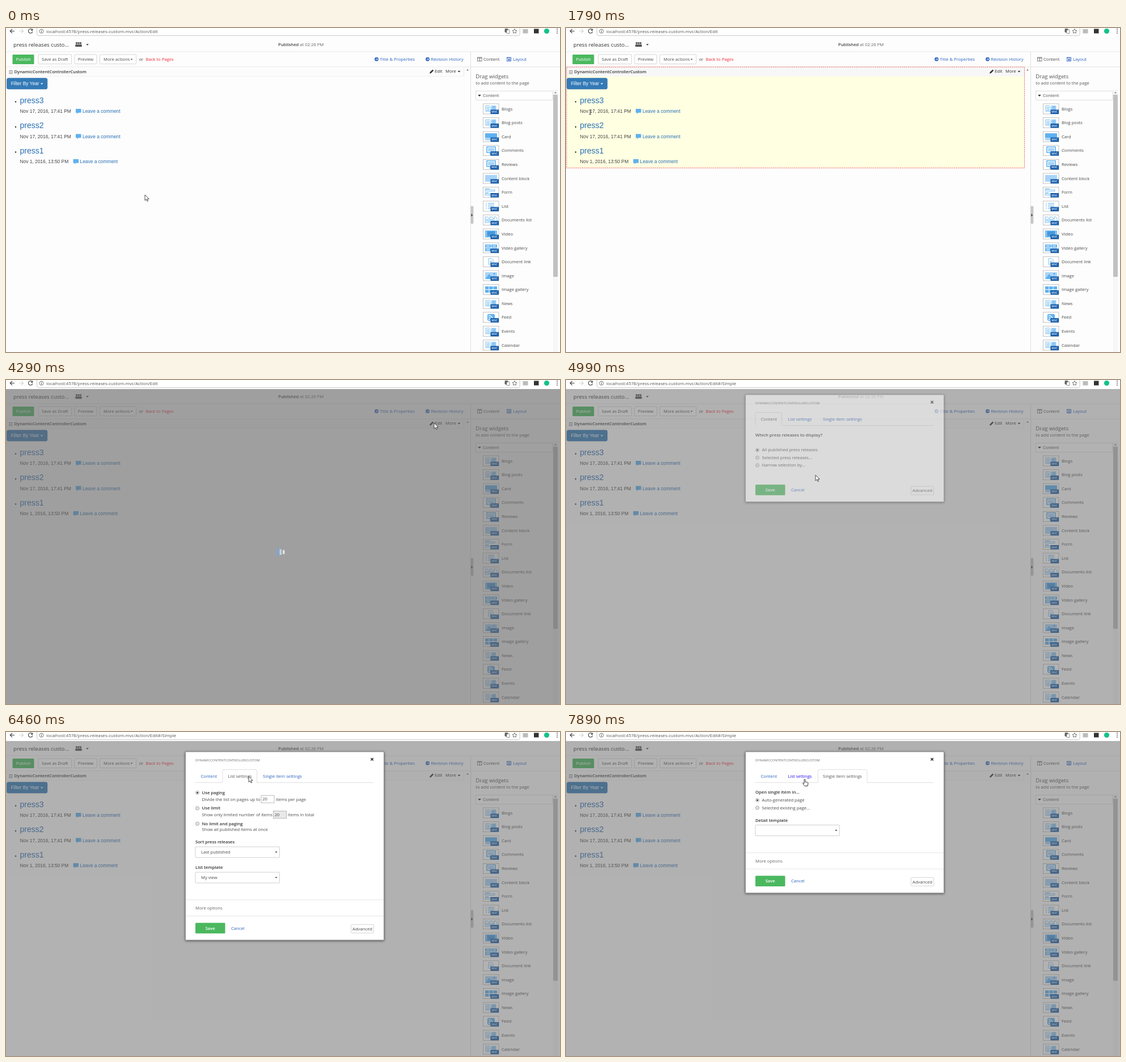
These frames come from a looping animation (977 by 573 pixels, 8 s). An HTML page:

```html
<!DOCTYPE html>
<html lang="en">
<head>
<meta charset="utf-8">
<title>Page editor</title>
<style>
html, body { margin: 0; width: 100%; height: 100%; overflow: hidden; background: #fff; }
svg { display: block; width: 100vw; height: 100vh; font-family: "Open Sans", "Noto Sans", sans-serif; }
.arial { font-family: "Liberation Sans", Arial, sans-serif; }
</style>
</head>
<body>
<svg id="stage" viewBox="0 0 977 573" xmlns="http://www.w3.org/2000/svg"></svg>
<script>
const BLUE = '#2a62bd', LINK = '#2a6fb5', MID = '#5fb1ef', PALE = '#a9d4f7', GREY = '#4a4a4a', GREEN = '#4bb85f';
const SIZE = 7.65;

const rect = (x, y, w, h, fill, extra = '') =>
  `<rect x="${x}" y="${y}" width="${w}" height="${h}" fill="${fill}" ${extra}/>`;
const box = (x, y, w, h, stroke = '#ccc', fill = '#fff', r = 1) =>
  rect(x, y, w, h, fill, `stroke="${stroke}" stroke-width=".8" rx="${r}"`);
const path = (d, fill = 'none', stroke = 'none', w = 1) =>
  `<path d="${d}" fill="${fill}" stroke="${stroke}" stroke-width="${w}"/>`;
const circle = (x, y, r, fill, stroke = 'none', w = .8) =>
  `<circle cx="${x}" cy="${y}" r="${r}" fill="${fill}" stroke="${stroke}" stroke-width="${w}"/>`;
const group = (id, body, attrs = '') => `<g id="${id}" ${attrs}>${body}</g>`;
const caret = (x, y, fill = GREY, r = 2.4) => path(`M${x - r} ${y - r / 2}h${2 * r}l${-r} ${r * 1.1}z`, fill);

// Text centred vertically on y.
function text(x, y, s, fill = GREY, o = {}) {
  const size = o.size || SIZE;
  return `<text x="${x}" y="${y + size * .36}" font-size="${size}" fill="${fill}"` +
    ` font-weight="${o.weight || 400}" text-anchor="${o.anchor || 'start'}"` +
    `${o.arial ? ' class="arial"' : ''}${o.id ? ` id="${o.id}"` : ''}>${s}</text>`;
}
const bold = (x, y, s, fill = '#333') => text(x, y, s, fill, { weight: 600 });
const mid = (x, y, s, fill, o = {}) => text(x, y, s, fill, { ...o, anchor: 'middle' });

function browserBar() {
  return rect(0, 0, 977, 16, '#fff') +
    path('M54.5 0V10.5Q54.5 13.5 57.5 13.5H903Q906 13.5 906 10.5V0', '#fff', '#bdbdbd', .8) +
    path('M15 5.5H7.5M11 2L7.3 5.5L11 9', 'none', '#444', 1.2) +
    path('M23 5.5H30.5M27 2L30.7 5.5L27 9', 'none', '#d5d5d5', 1.2) +
    path('M46 3A3.7 3.7 0 1 0 46.8 6.3', 'none', '#444', 1.2) + path('M47.3 1V4.7H43.6z', '#444') +
    circle(62.5, 5.7, 3.5, 'none', '#555') + path('M62.5 5.2V7.7M62.5 3.5V4.4', 'none', '#555') +
    text(71, 5.7, 'localhost:4578/press-releases-custom-mvc/Action/Edit<tspan id="hash">#/Simple</tspan>', '#555', { size: 7.8 }) +
    box(880, 1.5, 5, 6, '#555', '#666', .5) + box(883, 3.5, 5, 6, '#777', '#fff', .5) +
    path('M897 1.5l1.2 2.7 2.9.3-2.2 1.9.7 2.9-2.6-1.5-2.6 1.5.7-2.9-2.2-1.9 2.9-.3z', 'none', '#555', .8) +
    rect(911.5, 2, 9, 7.5, '#bcbcbc') + rect(931, 1.5, 8.5, 8, '#333') + circle(953.5, 5.5, 4.6, '#16c18a') +
    [2, 5.5, 9].map(y => circle(972, y, .9, '#555')).join('');
}

function button(x, w, label) {
  return box(x, 47, w, 16.5) + label;
}

function toolbar() {
  const people = [124.5, 131.5, 128].map(x => circle(x, 26.8, 1.8, '#555') + rect(x - 2.4, 29, 4.8, 4.2, '#555', 'rx="1.5"')).join('');
  const plus = x => circle(x, 55.2, 3.4, BLUE) + path(`M${x - 2} 55.2h4M${x} 53.4l2 1.8l-2 1.8`, 'none', '#fff', .8);
  return text(13, 29.5, 'press releases custo...', '#333', { size: 9.65 }) + people + caret(143.5, 29.5) +
    text(480, 29.5, '<tspan font-weight="600" fill="#444">Published</tspan> at 02:26 PM', '#666') +
    rect(0, 41.5, 977, .9, '#e6e6e6') + rect(0, 68.4, 977, .9, '#e2e2e2') +
    rect(11.5, 47, 38, 17, GREEN, 'rx="1"') + mid(30.5, 55.3, 'Publish', '#fff') +
    button(57, 58.5, mid(86.2, 55.3, 'Save as Draft')) +
    button(121, 39, mid(140.5, 55.3, 'Preview')) +
    button(165.5, 64, text(172, 55.3, 'More actions') + caret(221.5, 55.5, GREY, 1.9)) +
    text(234.5, 55, 'or') + text(246.5, 55, 'Back to Pages', '#f2293a') +
    plus(653.5) + text(659.5, 55, 'Title &amp; Properties', BLUE) +
    plus(743.5) + text(749.5, 55, 'Revision History', BLUE) +
    box(831.5, 52, 7.5, 6.5, '#666', '#fff', 0) + path('M831 53H839.4M835.3 53V58', 'none', '#666', .9) +
    text(842, 55, 'Content') +
    box(883.5, 52, 7, 6.5, BLUE, '#fff', 0) + path('M883 53H891M885 55.5h4.5M885 57h4.5', 'none', BLUE, 1) +
    text(894, 55, 'Layout', BLUE);
}

function entry(title, date, y, x) {
  return circle(17, y + 3, 1.2, '#333') +
    text(24.5, y, title, LINK, { size: 14, arial: 1 }) +
    text(24.5, y + 19.5, date, '#444', { size: 8.4, arial: 1 }) +
    path(`M${x} ${y + 15.5}h9.5v6.7h-5l-2.3 2.4v-2.4h-2.2z`, MID) +
    text(x + 12, y + 19.5, 'Leave a comment', LINK, { size: 8.4, arial: 1 });
}

function widget() {
  const burger = [75.2, 77.7, 80.2].map(y => rect(5, y, 7, .9, '#777')).join('');
  return rect(0, 69.3, 808, 16, '#fcfcfc') + rect(0, 85, 808, .7, '#ececec') + rect(807, 70, .7, 15, '#e4e4e4') +
    group('hover', rect(1, 69, 807.5, 178.5, '#ffffe2') + rect(1, 69, 807.5, 16.5, '#f7f7f7') +
      rect(1, 69, 807.5, 178.5, 'none', 'stroke="#f0595f" stroke-dasharray="2 1.4"')) +
    burger + bold(14.5, 77.2, 'DynamicContentControllerCustom') +
    path('M747 80.5l.7-2.4 4.7-4.7 1.8 1.8-4.7 4.7z', '#333') +
    text(756, 76.7, 'Edit', '#333') + text(775, 76.7, 'More', '#333') + caret(799, 77, '#333') +
    rect(1.5, 88.7, 71.3, 19.3, '#337ab7', 'id="filter" stroke="#2e6da4" stroke-width=".7" rx="2.6"') +
    text(8.7, 98.3, 'Filter By Year', '#fff', { size: 8.4, arial: 1 }) + caret(63.2, 98.7, '#fff', 2.2) +
    entry('press3', 'Nov 17, 2016, 17:41 PM', 127.5, 123) +
    entry('press2', 'Nov 17, 2016, 17:41 PM', 172, 123) +
    entry('press1', 'Nov 1, 2016, 13:50 PM', 216.5, 118.5) +
    path('M812 75.2l2-2.4 2 2.4z', '#777');
}

// Glyphs inside a 28 x 19 tile.
const lines = (x, y, w, n, step = 2.5, c = MID) =>
  Array.from({ length: n }, (_, i) => rect(x, y + i * step, w, 1, c)).join('');
const page = (x, w = 6) => path(`M${x} 4h${w - 2}l2 2v8h${-w}z`, '#fff', MID, .8);
const glyphs = {
  doc: () => page(5, 9) + lines(6.5, 6.5, 5.5, 3) + rect(15, 3.5, 8.5, 11, PALE) + lines(16.5, 5.5, 5.5, 3),
  card: () => rect(4, 3.5, 21, 8, MID) + rect(4, 11.5, 21, 4.5, PALE),
  talk: () => path('M7 3h15v10h-6l-3 3v-3h-6z', '#fff', MID, 1.6) + rect(9, 5, 11, 6, PALE),
  block: () => rect(4, 3.5, 21, 12, PALE),
  form: () => rect(4, 3, 8, 1, MID) + box(4, 5, 17, 2.5, MID, '#fff', 0) + rect(4, 10, 6, 1, MID) + box(4, 12, 14, 2.5, MID, '#fff', 0),
  list: () => lines(5, 4, 1.8, 4, 3) + lines(9, 4, 11, 4, 3),
  docs: () => page(4) + page(12) + page(20, 5) + lines(5, 8, 4, 2) + lines(13, 8, 4, 2),
  film: () => rect(4, 3.5, 21, 12, MID) + rect(8, 5, 13, 8, '#4697dc') + lines(5, 5, 1.5, 4, 2.5, '#fff') + lines(22.5, 5, 1.5, 4, 2.5, '#fff'),
  films: () => [4, 15].map(x => [3.5, 10].map(y => rect(x, y, 10, 5.5, MID) + rect(x + 2, y + 1, 6, 3.5, PALE)).join('')).join(''),
  link: () => page(10, 8) + lines(12, 8, 4, 2),
  image: () => rect(4, 3.5, 21, 12, PALE) + path('M4 15.5l7-9 5 6 3-3 6 6z', MID) + circle(20, 6.2, 1.6, MID),
  images: () => [4, 11.3, 18.6].map(x => rect(x, 4, 6.4, 5, MID) + rect(x, 10, 6.4, 5, MID)).join(''),
  feed: () => rect(8, 3.5, 13, 12, MID, 'rx="2.5"') + circle(11, 12.7, 1.2, '#fff') + path('M10 9a4.5 4.5 0 0 1 4.5 4.5M10 6a7.5 7.5 0 0 1 7.5 7.5', 'none', '#fff', 1.2)
};
const widgets = ['Blogs|doc', 'Blog posts|doc', 'Card|card', 'Comments|talk', 'Reviews|talk', 'Content block|block',
  'Form|form', 'List|list', 'Documents list|docs', 'Video|film', 'Video gallery|films', 'Document link|link',
  'Image|image', 'Image gallery|images', 'News|doc', 'Feed|feed', 'Events|doc', 'Calendar|doc'];

function sidebar() {
  const tiles = widgets.map((entry, i) => {
    const [name, kind] = entry.split('|'), y = 143 + i * 24.58;
    return `<g transform="translate(841 ${y - 9.5})">` + box(.5, .5, 27.5, 18, '#b5b5b5', '#fff', 0) + glyphs[kind]() +
      rect(13.5, 11, 14.5, 7.5, '#0b56a8') + mid(20.8, 14.8, 'MVC', '#fff', { size: 5, weight: 600 }) + '</g>' +
      text(874, y, name);
  }).join('');
  return rect(819, 42, .9, 531, '#dcdcdc') + rect(819.5, 315, 4.8, 31, '#c6c6c6') + path('M820.5 328.5l2.6 2.5-2.6 2.5z', '#333') +
    text(828.3, 85.8, 'Drag widgets', '#555', { size: 9.55 }) + text(828.3, 97.7, 'to add content to the page', '#555') +
    box(828.5, 111.5, 135.5, 16, '#d8d8d8', '#fff', 0) + caret(835, 119.5, '#333', 2.8) + text(841, 119.3, 'Content') +
    rect(965, 109, 8, 464, '#f6f6f6') + path('M967 115.2l2-2.3 2 2.3z', '#777') + rect(965, 118, 8, 322, '#c1c1c1') + tiles;
}

const radio = (y, on) => circle(337.5, y + .3, 3.1, on ? '#fff' : '#e4e4e4', '#999', .8) + (on ? circle(337.5, y + .3, 1.6, '#444') : '');
const option = (y, s, on) => radio(y, on) + text(345.5, y, s);
const select = (y, s) => box(334, y - 9.5, 148.5, 19, '#c4c4c4') + text(344, y, s) + caret(476.5, y, '#333', 2);
const number = (x, y, fill) => box(x, y - 6.5, 23, 13, '#aaa', fill, 0) + text(x + 2.2, y, '20');

const pages = [
  { bottom: 224.5, tab: [334, 46.5], body: bold(334, 106.5, 'Which press releases to display?') +
      option(132.5, 'All published press releases', 1) + option(146, 'Selected press releases...') + option(159.5, 'Narrow selection by...') },
  { bottom: 368, tab: [382, 60.5], more: 1, body:
      radio(107, 1) + bold(345.5, 107, 'Use paging') + text(345.5, 119, 'Divide the list on pages up to') + number(450, 118.7, '#fff') + text(476, 119, 'items per page') +
      radio(134.5) + bold(345.5, 134.5, 'Use limit') + text(345.5, 146.5, 'Show only limited number of items') + number(471.5, 146.3, '#e8e8e8') + text(497, 146.5, 'items in total') +
      radio(162) + bold(345.5, 162, 'No limit and paging') + text(345.5, 172.5, 'Show all published items at once') +
      bold(334, 194.5, 'Sort press releases') + select(212.5, 'Last published') +
      bold(334, 239.5, 'List template') + select(257.5, 'My view') },
  { bottom: 284.8, tab: [444.5, 86.5], more: 1, body: bold(334, 106.5, 'Open single item in...') +
      option(120.3, 'Auto-generated page', 1) + option(133.8, 'Selected existing page...') +
      bold(334, 156, 'Detail template') + select(174, '') }
];

function dialogPage({ bottom, tab: [x, w], more, body }, i) {
  const y = bottom - 21.2;
  const options = more ? rect(317, bottom - 71.5, 349, .8, '#e0e0e0') + text(334, bottom - 56.8, 'More options', '#666') +
    rect(317, bottom - 43, 349, .8, '#e0e0e0') : '';
  return group('page' + i, rect(316.5, 35, 350, bottom - 35, '#fff', 'filter="url(#shadow)" stroke="#777" stroke-width=".7"') +
    path(`M334 89.5H${x}V68.5q0-2 2-2h${w - 4}q2 0 2 2V89.5H648.5`, 'none', '#d9d9d9', .8) + body + options +
    rect(334, y - 9.3, 52.5, 18.7, GREEN, 'rx="1.5"') + mid(360.2, y, 'Save', '#fff', { weight: 600 }) +
    text(397, y, 'Cancel', BLUE) + box(608.5, y - 6.3, 40, 15, '#ccc') + mid(628.5, y + 1.2, 'Advanced'));
}

function dialog() {
  return group('dialog', pages.map(dialogPage).join('') +
    text(334, 49.7, 'DYNAMICCONTENTCONTROLLERCUSTOM', '#666', { size: 5.85 }) +
    path('M643.4 46l4.4 4.4M647.8 46l-4.4 4.4', 'none', '#333', 1.5) +
    text(343.5, 78, 'Content', BLUE, { id: 'tab0' }) + text(391.5, 78, 'List settings', BLUE, { id: 'tab1' }) +
    text(453, 78, 'Single item settings', BLUE, { id: 'tab2' }));
}

const cursors =
  group('arrow', path('M0 0V10L2.4 7.9 4 11.5 5.6 10.8 4.1 7.3H7.2z', '#fff', '#222', .8)) +
  group('hand', path('M-1 .8q1-1.6 2 0v4l4 .8q1 .4.9 1.6l-.7 4.8h-5.3l-3.4-4.6q.3-1.5 2.5.1z', '#fff', '#222', .9)) +
  group('beam', path('M-1.8-4H-.4L0-3.6.4-4H1.8M0-3.6V3.6M-1.8 4H-.4L0 3.6.4 4H1.8', 'none', '#222', .9));

const stage = document.getElementById('stage');
stage.innerHTML = '<defs><filter id="shadow" x="-5%" y="-10%" width="110%" height="120%">' +
  '<feDropShadow dx="0" dy="1" stdDeviation="2.2" flood-opacity=".6"/></filter></defs>' +
  rect(0, 0, 977, 573, '#fdfdfd') + toolbar() + widget() + sidebar() +
  rect(0, 16, 977, 557, '#666', 'id="shade"') +
  group('loader', [0, 1, 2].map(i => rect(0, 0, 3.4, 1, '#fff', `id="bar${i}"`)).join('')) +
  dialog() + browserBar() + group('cursor', cursors);

// Pointer stops: time, x, y, shape.
const stops = [
  [0, 245, 295, 'arrow'], [1430, 188, 270, 'arrow'], [1550, 120, 215, 'arrow'], [1670, 70, 172, 'beam'], [1790, 42.5, 149, 'beam'],
  [1940, 42, 99, 'hand'], [2090, 46, 90, 'hand'], [2210, 51, 77, 'arrow'], [2520, 209, 77, 'arrow'],
  [2670, 370, 97, 'arrow'], [2790, 555, 108, 'arrow'], [2910, 718, 85, 'arrow'],
  [3060, 736, 82, 'arrow'], [3180, 748, 77, 'hand'], [3300, 754, 76, 'hand'], [3420, 756.5, 77, 'hand'],
  [4290, 755, 76, 'arrow'], [4590, 706, 91, 'arrow'], [4740, 600, 126, 'arrow'], [4860, 510, 152, 'arrow'], [4990, 440, 168, 'arrow'],
  [5130, 400, 172, 'arrow'], [5250, 385, 172, 'arrow'], [5560, 407, 165, 'arrow'], [5680, 432, 140, 'arrow'], [5800, 455, 115, 'arrow'],
  [5920, 467, 96, 'arrow'], [6040, 470, 82, 'hand'], [6200, 440, 81, 'hand'], [6320, 429, 80, 'hand'],
  [6460, 428, 78.5, 'arrow'], [6580, 428, 88, 'arrow'], [6700, 427, 99, 'arrow'], [6820, 426, 107, 'arrow'],
  [7130, 455, 91, 'arrow'], [7290, 468, 84, 'hand'], [7430, 469, 83.5, 'hand'], [7580, 467, 83.5, 'arrow'], [7890, 421, 83.5, 'hand']
];
const el = id => document.getElementById(id);
const show = (id, on) => el(id).setAttribute('display', on ? 'inline' : 'none');
const set = (id, attrs) => { for (const k in attrs) el(id).setAttribute(k, attrs[k]); };
const between = (t, a, b) => t >= a && t < b;

function draw(t) {
  const [, x, y, shape] = stops.findLast(s => s[0] <= t);
  set('cursor', { transform: `translate(${x} ${y})` });
  ['arrow', 'hand', 'beam'].forEach(s => show(s, s === shape));

  show('hover', between(t, 1550, 4290));
  set('filter', { fill: between(t, 1940, 2210) ? '#286090' : '#337ab7' });
  set('shade', { 'fill-opacity': t < 4290 ? 0 : t < 4740 ? .62 : .5 });
  show('hash', t >= 4740);

  show('loader', between(t, 4290, 4740));
  const tall = t < 4440 ? 0 : 1;
  for (let i = 0; i < 3; i++) {
    const far = Math.abs(i - tall), h = [16, 10, 7][far];
    set('bar' + i, { x: 477 + i * 5.5, y: 304.3 - h / 2, height: h, fill: ['#7fa6d0', '#c3d3e6', '#dde5ee'][far] });
  }

  const page = t < 6460 ? 0 : t < 7580 ? 1 : 2;
  const [lift, alpha] = t < 5130 ? [-9, .55] : t < 5250 ? [-3, .9] : [0, 1];
  show('dialog', t >= 4990);
  set('dialog', { transform: `translate(0 ${lift})`, opacity: alpha });
  const over = between(t, 6040, 6200) || between(t, 7290, 7580) ? 2 : between(t, 6200, 6460) || t >= 7890 ? 1 : -1;
  for (let i = 0; i < 3; i++) {
    show('page' + i, i === page);
    set('tab' + i, { fill: i === page ? '#555' : i === over ? '#2412ee' : BLUE });
  }
}

const start = performance.now();
function tick() {
  draw((performance.now() - start) % 8000);
  requestAnimationFrame(tick);
}
tick();
</script>
</body>
</html>
```
